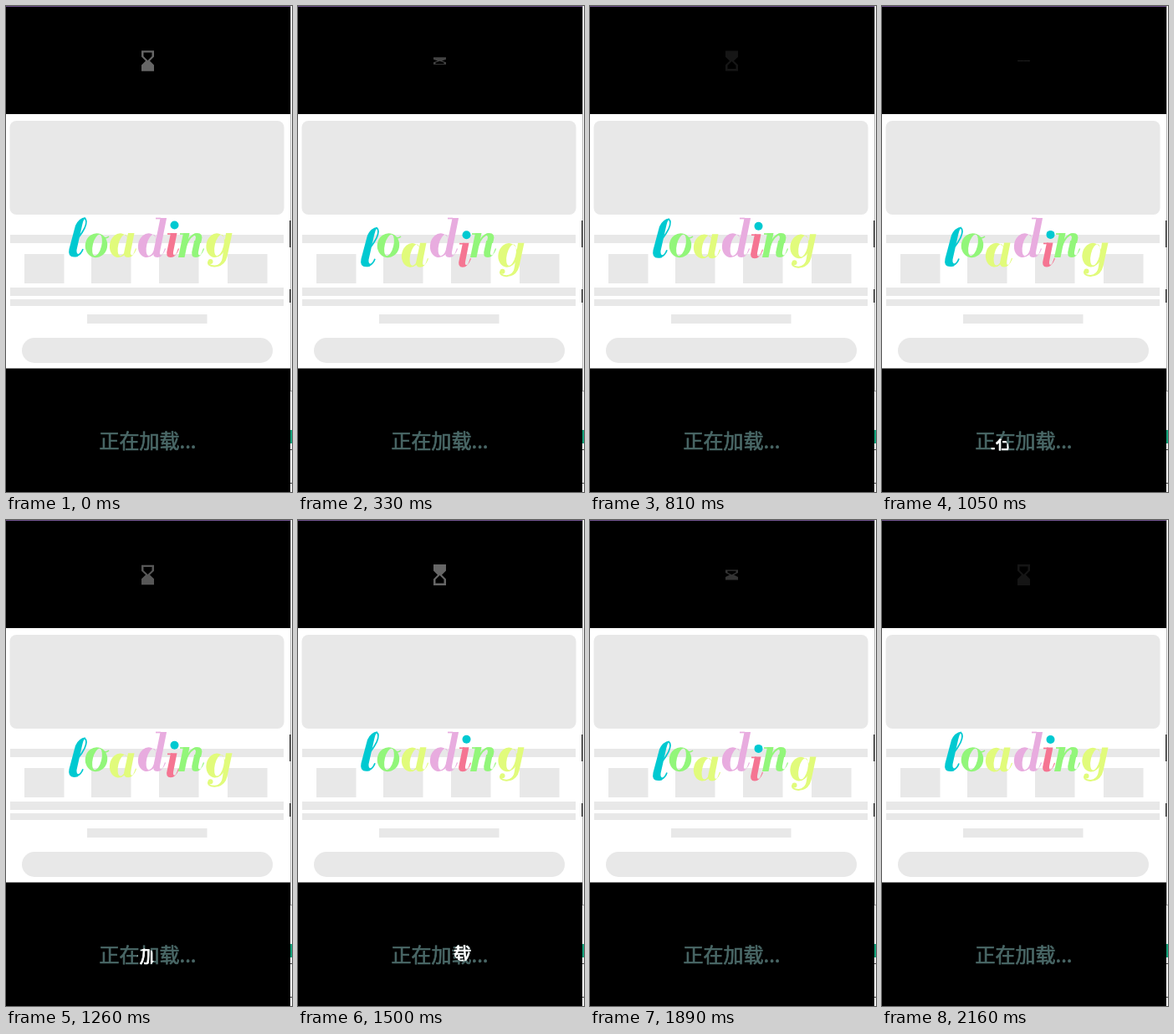
An HTML page with a canvas that plays this animation: 342 px wide and 580 px high, repeating every 2190 ms.

```html
<!DOCTYPE html>
<html lang="zh">
<head>
<meta charset="utf-8">
<style>
html, body { margin: 0; width: 100%; height: 100%; overflow: hidden; background: #000; }
canvas { display: block; }
</style>
</head>
<body>
<canvas id="stage" width="342" height="580"></canvas>
<script>
const ctx = document.getElementById("stage").getContext("2d");
const LOOP = 2190, STEP = 30;
const BOB = 735, DROP = 12;      // letter bounce
const TURN = 767, LEAD = 108;    // hourglass half-turns
const CAPTION = "正在加载...";

const CYAN = "#00c9d1", GREEN = "#92f67a", LIME = "#e1fb7b", PINK = "#e8acdf", ROSE = "#f57592";

const glass = new Path2D("M18 22l-.01-6L14 12l3.99-4.01L18 2H6v6l4 4-4 3.99V22h12zM8 7.5V4h8v3.5l-4 4-4-4z");

function rect(color, x, y, w, h, r = 0) {
  ctx.fillStyle = color;
  ctx.beginPath();
  ctx.roundRect(x, y, w, h, r);
  ctx.fill();
}

// smooth 0..1..0 wave
const wave = (t, period) => (1 - Math.cos(2 * Math.PI * t / period)) / 2;

// slanted heavy stroke ending in a curled foot; x is its left side at y 271
function stem(x, top) {
  const at = y => x - (y - 271) * 0.2;
  const p = new Path2D();
  p.moveTo(at(top), top);
  p.lineTo(at(top) + 7.5, top);
  p.lineTo(at(291) + 7.5, 291);
  p.quadraticCurveTo(at(298) + 7, 299, at(298) + 11, 297);
  p.quadraticCurveTo(x + 7, 295, x + 9, 289);
  p.lineTo(x + 10, 290);
  p.quadraticCurveTo(x + 6, 300, x, 300);
  p.quadraticCurveTo(x - 7, 300, at(291), 290);
  p.closePath();
  return { p };
}

// round bowl with a narrow tilted counter
function bowl(cx, rx, hole) {
  const p = new Path2D();
  p.ellipse(cx, 285.7, rx, 14.5, 0.2, 0, 7);
  p.closePath();
  p.moveTo(cx + hole, 285.5);
  p.ellipse(cx + hole, 285.5, 5.2, 13, 0.24, 0, 7);
  return { p };
}

const shape = d => ({ p: new Path2D(d) });
const hair = (d, w = 1.7) => ({ p: new Path2D(d), w });

function dot(x, y, r, color) {
  const p = new Path2D();
  p.arc(x, y, r, 0, 7);
  return { p, color };
}

const letters = [
  { color: CYAN, parts: [
    shape("M83 262Q87 253 95 252Q92 256 91 262L84.5 291Q84 296 87 296L86 299Q73 302 75.5 290Z"),
    hair("M94 253Q98 256 94 265Q91 271 87 276"),
    hair("M85 298Q90 296 92 290") ] },
  { color: GREEN, parts: [bowl(108, 13.2, 1), hair("M115 276Q120 278 123 275")] },
  { color: LIME, parts: [bowl(135.5, 11.5, 4), stem(146, 271)] },
  { color: PINK, parts: [bowl(169.5, 11.5, 4), stem(181, 253), hair("M179 253.5h6")] },
  { color: ROSE, parts: [stem(197, 271), hair("M193 272h6"), dot(201.5, 261.5, 5, CYAN)] },
  { color: GREEN, parts: [
    shape("M212 271h7.5l-6 29h-7.5Z"),
    hair("M208 272h6"),
    hair("M215 286Q220 273 228 272", 2.2),
    shape("M225 271.5Q236 269 234 279L233 283H225.5L227 276Z"),
    stem(227, 280) ] },
  { color: LIME, parts: [
    bowl(251, 11.5, 4),
    shape("M263 271h7.5l-6 28Q262 309 253 311Q258 307 259 299Z"),
    hair("M261 300Q257 311 249 310.5Q241 310 242 305", 2),
    dot(244.5, 305, 3) ] }
];

function drawLetters(t) {
  const drop = DROP * wave(t, BOB);
  letters.forEach((letter, i) => {
    ctx.save();
    if (i % 2 === 0) ctx.translate(0, drop);
    for (const { p, w, color = letter.color } of letter.parts) {
      ctx.fillStyle = ctx.strokeStyle = color;
      if (w) {
        ctx.lineWidth = w;
        ctx.stroke(p);
      } else {
        ctx.fill(p, "evenodd");
      }
    }
    ctx.restore();
  });
}

function drawGlass(t) {
  const turn = (t + LEAD) / TURN;
  const swaps = Math.floor(turn / 2);  // the sand changes ends after every full turn
  const angle = Math.PI * (Math.floor(turn) + swaps + wave(turn % 1, 2));
  const v = Math.round(102 - 82 * wave(t, 2 * BOB));
  ctx.save();
  ctx.translate(169.5, 65.5);
  ctx.scale(1.25, 1.25 * Math.cos(angle));
  ctx.translate(-12, -12);
  ctx.fillStyle = `rgb(${v},${v},${v})`;
  ctx.fill(glass);
  ctx.restore();
}

function writeCaption(color) {
  ctx.font = '24px "Noto Sans CJK SC", "Noto Sans CJK", sans-serif';
  ctx.fillStyle = ctx.strokeStyle = color;
  ctx.lineWidth = 0.7;
  ctx.fillText(CAPTION, 111.5, 528);
  ctx.strokeText(CAPTION, 111.5, 528);
}

function drawCaption(t) {
  writeCaption("#4a6867");
  if (t < 830 || t > 1800) return;
  // small spotlight gliding along the words
  const k = (t - 1050) / 450;
  ctx.save();
  ctx.beginPath();
  ctx.arc(141 + 56 * k, 527 - 11 * k, 10.5, 0, 7);
  ctx.clip();
  writeCaption("#fff");
  ctx.restore();
}

function drawPage() {
  const grey = "#e8e8e8";
  rect("#000", 0, 0, 342, 580);
  rect("#fff", 0, 129, 340, 303.5);
  rect(grey, 4.5, 137, 328, 112, 8);
  rect(grey, 5, 273, 327, 10);
  for (const x of [22, 102, 183, 265]) rect(grey, x, 296, 47.5, 35);
  rect(grey, 5, 336, 327, 10);
  rect(grey, 5, 350, 327, 8);
  rect(grey, 97, 368, 143.5, 11);
  rect(grey, 19, 396, 300, 30, 15);
}

function drawEdge() {
  rect("#fff", 340, 0, 2, 580);
  rect("#b5b5b5", 340, 0, 1, 460);
  rect("#333", 339, 256, 1.5, 32);
  rect("#333", 339, 338, 1.5, 16);
  rect("#999", 340, 459, 2, 1);
  rect("#14a57c", 340, 506, 2, 16);
  rect("#444", 340, 529, 2, 1);
  rect("#444", 340, 569, 2, 1);
  rect("#70538f", 0, 0, 340, 1);
}

function render(elapsed) {
  const t = Math.floor((elapsed % LOOP) / STEP) * STEP;
  drawPage();
  drawGlass(t);
  drawLetters(t);
  drawCaption(t);
  drawEdge();
}

requestAnimationFrame(start => {
  const tick = now => {
    render(now - start);
    requestAnimationFrame(tick);
  };
  tick(start);
});
</script>
</body>
</html>
```
